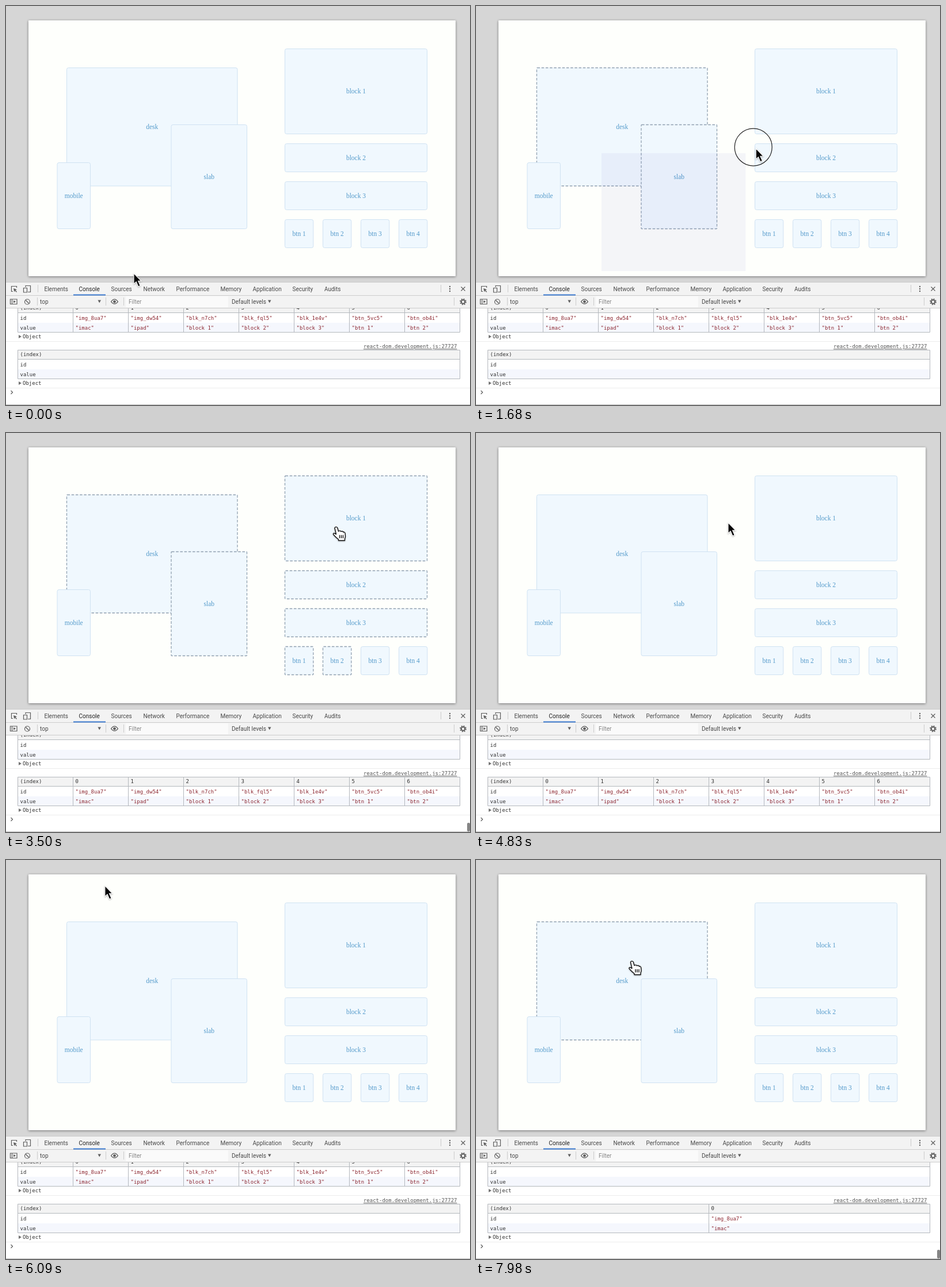
An HTML page for the animation above (8 s loop, 806 px wide and 694 px high).

```html
<!DOCTYPE html>
<html lang="en">
<head>
<meta charset="utf-8">
<title>Lasso selection</title>
<style>
  html, body { margin: 0; width: 100%; height: 100%; overflow: hidden; background: #d6d6d6; }
  svg { display: block; }
  text { white-space: pre; }
  .page { fill: #fefffc; filter: drop-shadow(0 1px 2px rgba(0, 0, 0, .45)); }
  .block rect { fill: #f0f8fe; stroke: #cfe2f2; }
  .block text { font: 11.5px "Liberation Serif", serif; fill: #559bcb; text-anchor: middle; }
  .block.on rect { stroke: #91a1b1; stroke-width: 1.3; stroke-dasharray: 4.6 2.6; rx: 1px; }
  .ui { font: 10px Roboto, sans-serif; fill: #484848; }
  .icon { fill: none; stroke: #5c5c5c; stroke-width: 1.2; }
  .mono { font: 9px "DejaVu Sans Mono", monospace; fill: #303030; }
  .string { fill: #8c2630; }
  .rule { stroke: #b4b8bd; fill: none; }
  .faint { stroke: #ececec; }
  .sep { stroke: #ccc; }
  #lasso { fill: rgba(70, 70, 170, .05); }
  #ring { fill: none; stroke: #202020; stroke-width: 1.2; }
  #arrow, #hand { filter: drop-shadow(0 1px 1px rgba(0, 0, 0, .3)); }
  #arrow path { fill: #050505; stroke: #fff; stroke-width: 1.1; }
  #hand path { fill: #fff; stroke: #111; stroke-width: 1.4; stroke-linejoin: round; }
</style>
</head>
<body>
<svg width="806" height="694" viewBox="0 0 806 694">
  <rect width="806" height="480" fill="#d6d6d6"/>
  <rect class="page" x="39" y="25" width="742" height="445" rx="1"/>
  <g id="blocks"></g>
  <rect id="lasso"/>

  <rect y="480" width="806" height="214" fill="#fff"/>
  <g id="console" class="mono"></g>
  <rect id="thumb" x="801" y="678" width="5" height="15" rx="2" fill="#858585"/>
  <path d="M0 693.5H806" stroke="#bdbdbd"/>

  <rect y="480" width="806" height="46" fill="#f3f3f3"/>
  <rect x="208" y="505" width="178" height="19" fill="#fafafa"/>
  <path class="sep" d="M0 480.5H806M0 503.5H806M0 525.5H806M55.5 485V498M755.5 485V498M54.5 507V521M173.5 507V521M204.5 507V521M778.5 507V521"/>
  <path d="M117 502.5H173" stroke="#3f7cd0" stroke-width="2"/>
  <g id="tabs" class="ui"></g>
  <g class="ui">
    <text x="59" y="517.5">top</text>
    <text x="213" y="517.8" fill="#858585">Filter</text>
    <text x="392" y="517.5">Default levels</text>
    <path d="M159.5 511.5h5.5l-2.75 5zM455 511.5h5.5l-2.75 5z" fill="#606060"/>
  </g>
  <g class="icon">
    <path d="M12 496.5H9.5V487.5H18.5V490"/>
    <path d="M13 491l6 2.3-2.5 1 2.5 2.7-1 .9-2.5-2.7-1.2 2.3z" fill="#5c5c5c" stroke="none"/>
    <path d="M34 489V486.5H42.5V497.5H38M30.5 490.5H36.5V498H30.5Z"/>
    <path d="M790.5 488.5l7 7m0-7l-7 7"/>
    <path d="M7.5 510H19V518.5H7.5ZM10.5 510V518.5"/>
    <path d="M13 512l4 2.3-4 2.3z" fill="#5c5c5c" stroke="none"/>
    <circle cx="37" cy="514.5" r="4.5"/><path d="M34 511.5l6 6"/>
    <path d="M182.5 514.3Q188.5 506 194.5 514.3Q188.5 522 182.5 514.3Z"/>
    <circle cx="188.5" cy="514.3" r="1.8" fill="#5c5c5c"/>
    <circle cx="794" cy="514.5" r="3.2" stroke-width="2"/>
    <circle cx="794" cy="514.5" r="5" stroke-width="1.7" stroke-dasharray="1.96 1.967"/>
  </g>
  <g fill="#5c5c5c"><circle cx="771" cy="488" r="1.2"/><circle cx="771" cy="492" r="1.2"/><circle cx="771" cy="496" r="1.2"/></g>

  <circle id="ring" cx="-4.5" cy="-2.3" r="32.5"/>
  <g id="arrow"><path d="M0 0V18.5L4.2 14.7 7.8 23 11.2 21.5 7.6 13.4H13Z"/></g>
  <g id="hand">
    <path d="M-2.5 1.5C-2-1.5 1.8-1.2 2.5 1.5L4 7C6 5.5 8 6 8.5 7.5C10 6.3 12 7 12.3 8.5C14 7.7 15.5 9 15.7 11L16 16C16 18 15 19 15 20.5V23H4V21C2 19.5-1 17-4 13.5C-6.5 11-4 9.5-2 11L0 12Z"/>
    <path d="M6 13.5V19M9 13.5V19M12 13.5V19" stroke-width="1.1"/>
  </g>
</svg>
<script>
const $ = id => document.getElementById(id);
const LOOP = 8000, RECT_LAG = 60;

// label, x, y, width, height
const blocks = [
  ["desk", 105.5, 107.5, 296.5, 205.5],
  ["slab", 287, 206.5, 131.5, 181],
  ["mobile", 89, 272.5, 57.5, 115],
  ["block 1", 484.5, 74.5, 247, 148],
  ["block 2", 484.5, 239.5, 247, 49],
  ["block 3", 484.5, 305.5, 247, 49],
  ...[0, 1, 2, 3].map(i => ["btn " + (i + 1), 484.5 + 66 * i, 371.5, 49.3, 49])
].map(([label, x, y, w, h]) => ({ label, x, y, w, h }));

$("blocks").innerHTML = blocks.map(({ label, x, y, w, h }) =>
  `<g class="block"><rect x="${x}" y="${y}" width="${w}" height="${h}" rx="3"/>
   <text x="${x + w / 2}" y="${y + h / 2 + 3.6}">${label}</text></g>`).join("");
const blockNodes = [...$("blocks").children];

const tabs = { Elements: 66.5, Console: 126.5, Sources: 182.5, Network: 238.5, Performance: 295.5,
  Memory: 372.5, Application: 428.5, Security: 497.5, Audits: 553 };
$("tabs").innerHTML = Object.entries(tabs).map(([name, x]) =>
  `<text x="${x}" y="495.5"${name === "Console" ? ' fill="#222"' : ""}>${name}</text>`).join("");

// Console output: one table per selection change
const all = [["img_8ua7", "imac"], ["img_dw54", "ipad"], ["blk_n7ch", "block 1"], ["blk_fql5", "block 2"],
  ["blk_1e4v", "block 3"], ["btn_5vc5", "btn 1"], ["btn_ob4i", "btn 2"]];
const one = all.slice(0, 1), none = [];

function table(items, top) {
  const step = 768 / (items.length + 1);
  const columns = items.map(([id, value], i) => {
    const x = 20.5 + step * (i + 1);
    return `<path class="rule" d="M${x} 0V51"/><text x="${x + 4}" y="11">${i}</text>
      <g class="string"><text x="${x + 4}" y="29">"${id}"</text><text x="${x + 4}" y="45.5">"${value}"</text></g>`;
  }).join("");
  return `<g transform="translate(0 ${top})">
    <rect x="20" width="769" height="17" fill="#f3f3f3"/><rect x="20" y="34" width="769" height="16" fill="#f5f7fd"/>
    <path class="rule" d="M20.5 .5H788.5V50.5H20.5ZM20.5 16.5H788.5"/>${columns}
    <text x="24.5" y="11">(index)</text><text x="24.5" y="29">id</text><text x="24.5" y="45.5">value</text>
    <path d="M22 55l5 3-5 3z" fill="#727272"/><text x="29" y="61">Object</text>
    <path class="faint" d="M0 66.5H806"/></g>`;
}
const output = (first, second) => table(first, 517) + table(second, 598) +
  `<text x="783.5" y="595.3" text-anchor="end" text-decoration="underline" fill="#545454">react-dom.development.js:27727</text>
   <path class="icon" d="M8.5 669l3 3-3 3" stroke="#7a8290"/>`;
const logs = [[0, output(all, none)], [2800, output(none, all)], [4900, output(all, none)], [7800, output(none, one)]];

// time, x, y of the pointer
const path = [[0, 222, 465], [250, 221, 463], [720, 221, 463], [910, 257, 449], [1680, 486, 248],
  [2150, 577, 201], [2650, 577, 201], [3300, 573.5, 164], [3600, 573.5, 164], [4300, 438, 156], [5150, 438, 156],
  [6090, 172, 45], [6350, 150, 41], [6850, 150, 41], [7500, 271, 176.5], [8000, 271, 176.5]];
const drags = [[700, 2650], [4500, 4750], [6450, 7650]];

const secant = (i, axis) => (path[i + 1][axis] - path[i][axis]) / (path[i + 1][0] - path[i][0]);
function slope(i, axis) {
  if (i === 0 || i === path.length - 1) return 0;
  const a = secant(i - 1, axis), b = secant(i, axis);
  return a * b > 0 ? 2 * a * b / (a + b) : 0;
}

// Monotone cubic interpolation keeps the rests still and the passes smooth
function pointer(t) {
  const i = path.findIndex(p => p[0] > t) - 1;
  const span = path[i + 1][0] - path[i][0], u = (t - path[i][0]) / span;
  return [1, 2].map(axis => {
    const p = path[i][axis], q = path[i + 1][axis];
    return p + (q - p) * u * u * (3 - 2 * u)
      + span * u * (1 - u) * (slope(i, axis) * (1 - u) - slope(i + 1, axis) * u);
  });
}

// The lasso spans the hot spot, slightly up and left of the arrow's drawn tip
function lassoAt(t, [start, end]) {
  const [x0, y0] = pointer(start), [x1, y1] = pointer(Math.max(start, Math.min(t, end) - RECT_LAG));
  return { x: Math.min(x0, x1) - 3, y: Math.min(y0, y1) - 2, w: Math.abs(x1 - x0), h: Math.abs(y1 - y0) };
}
const overlaps = (a, b) => a.x < b.x + b.w && b.x < a.x + a.w && a.y < b.y + b.h && b.y < a.y + a.h;

function thumbOpacity(t) {
  const last = logs.filter(([at]) => at > 0 && at <= t).pop();
  return last ? Math.max(0, Math.min(1, (last[0] + 950 - t) / 200)) : 0;
}

function place(node, [x, y], visible) {
  node.setAttribute("transform", `translate(${x} ${y})`);
  node.style.display = visible ? "" : "none";
}

let shownLog;
function draw(t) {
  const drag = drags.filter(([start]) => start <= t).pop();
  const dragging = Boolean(drag) && t < drag[1];
  const lasso = drag && lassoAt(t, drag);
  const [x, y] = pointer(t);

  blocks.forEach((block, i) => blockNodes[i].classList.toggle("on", Boolean(lasso) && overlaps(lasso, block)));
  $("lasso").style.display = dragging ? "" : "none";
  if (dragging) {
    const { x, y, w, h } = lasso;
    Object.entries({ x, y, width: w, height: h }).forEach(([key, value]) => $("lasso").setAttribute(key, value));
  }

  const hovering = !dragging && blocks.some(block => overlaps({ x, y, w: 0, h: 0 }, block));
  place($("ring"), [x, y], dragging);
  place($("arrow"), [x, y], !hovering);
  place($("hand"), [x, y], hovering);

  const log = logs.filter(([at]) => at <= t).pop()[1];
  if (log !== shownLog) $("console").innerHTML = shownLog = log;
  $("thumb").setAttribute("opacity", thumbOpacity(t));
}

const began = performance.now();
function tick() {
  draw((performance.now() - began) % LOOP);
  requestAnimationFrame(tick);
}
tick();
</script>
</body>
</html>
```
